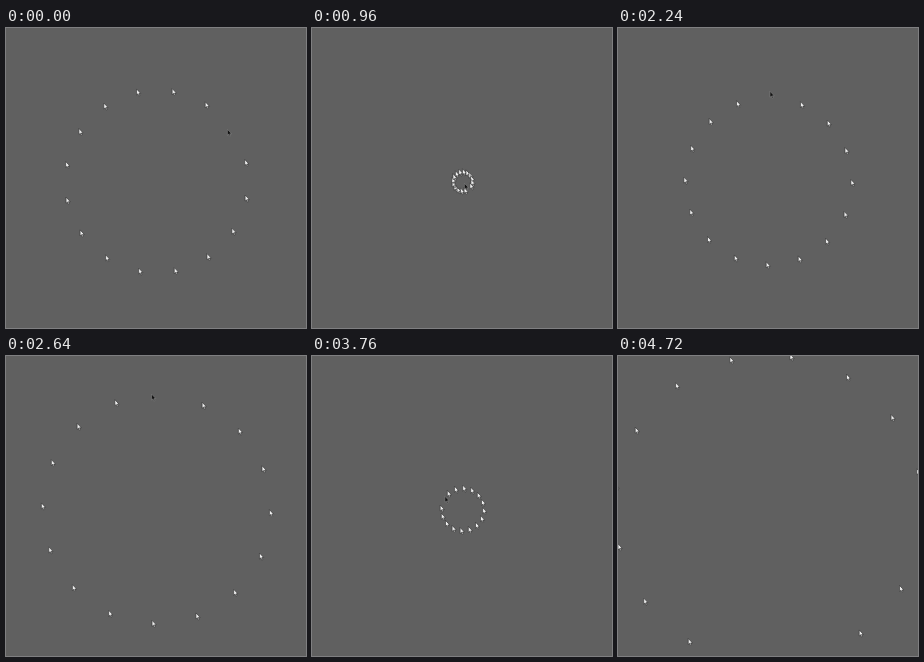
An HTML page for the animation above (4800 ms loop, 300 by 300 pixels).

```html
<!DOCTYPE html>
<html lang="en">
<head>
<meta charset="utf-8">
<title>Cursor ring</title>
<style>
html, body { margin: 0; width: 100%; height: 100%; overflow: hidden; background: #606060; }
svg { display: block; width: 100vw; height: 100vh; }
</style>
</head>
<body>
<svg id="stage" viewBox="0 0 300 300">
  <defs>
    <path id="arrow" d="M0 0V6L1.4 4.8L2.3 7L3.3 6.6L2.4 4.5H4.2Z" transform="translate(-2.1 -3.5)" stroke-width=".6" stroke-linejoin="round"/>
  </defs>
</svg>
<script>
const LOOP = 4800, STEP = 80, COUNT = 16, LEAD = 60;
const CX = 151.5, CY = 153.8;

// Path of the hand around the centre: time, x, y
const path = [
  [0, 75.3, -51.6], [60, 72, -49], [560, 34, -9], [960, 6, 7.5],
  [1020, 3, 5], [1120, -1, 1], [1600, -26.9, -26.9], [1660, -30.8, -31.8],
  [2240, 1.2, -83.5], [2300, 2.6, -87], [2560, 8, -115], [2800, -15, -108],
  [3120, -34.2, -67.1], [3180, -38.5, -63.6], [3360, -43, -43],
  [3760, -19.1, -9.3], [3820, -16.5, -10], [3920, -4, -3], [4000, 1, 1],
  [4140, 1, 1], [4320, 3, 10], [4480, 6.5, 25], [4640, 13, 52],
  [4700, 17, 70], [4720, 37.5, 149.4], [4800, 60, 240]
];

const slope = (i, k) => (path[i + 1][k] - path[i][k]) / (path[i + 1][0] - path[i][0]);

// Tangent that never overshoots
function tangent(i, k) {
  if (i === 0) return slope(0, k);
  if (i === path.length - 1) return slope(i - 1, k);
  const a = slope(i - 1, k), b = slope(i, k);
  return a * b > 0 ? 2 * a * b / (a + b) : 0;
}

function handAt(t) {
  let i = 0;
  while (i < path.length - 2 && t >= path[i + 1][0]) i++;
  const p = path[i], q = path[i + 1], d = q[0] - p[0], u = (t - p[0]) / d;
  const ease = u * u * (3 - 2 * u);
  return [1, 2].map(k => p[k] + (q[k] - p[k]) * ease
    + d * u * (1 - u) * ((1 - u) * tangent(i, k) - u * tangent(i + 1, k)));
}

const stage = document.getElementById("stage");

function addCursor(fill, stroke) {
  const el = document.createElementNS("http://www.w3.org/2000/svg", "use");
  el.setAttribute("href", "#arrow");
  el.setAttribute("fill", fill);
  el.setAttribute("stroke", stroke);
  return stage.appendChild(el);
}

function place(el, x, y) {
  el.setAttribute("transform", `translate(${(CX + x).toFixed(2)} ${(CY + y).toFixed(2)})`);
}

const copies = Array.from({ length: COUNT - 1 }, () => addCursor("#f0f0f0", "#2c2c2c"));
const hand = addCursor("#111", "#858585");

function draw(t) {
  const [x, y] = handAt(t);
  copies.forEach((el, i) => {
    const a = (i + 1) * 2 * Math.PI / COUNT, c = Math.cos(a), s = Math.sin(a);
    place(el, x * c - y * s, x * s + y * c);
  });
  place(hand, ...handAt(t + LEAD));
}

const start = performance.now();
function tick() {
  const t = (performance.now() - start) % LOOP;
  draw(Math.floor(t / STEP) * STEP);
  requestAnimationFrame(tick);
}
tick();
</script>
</body>
</html>
```
